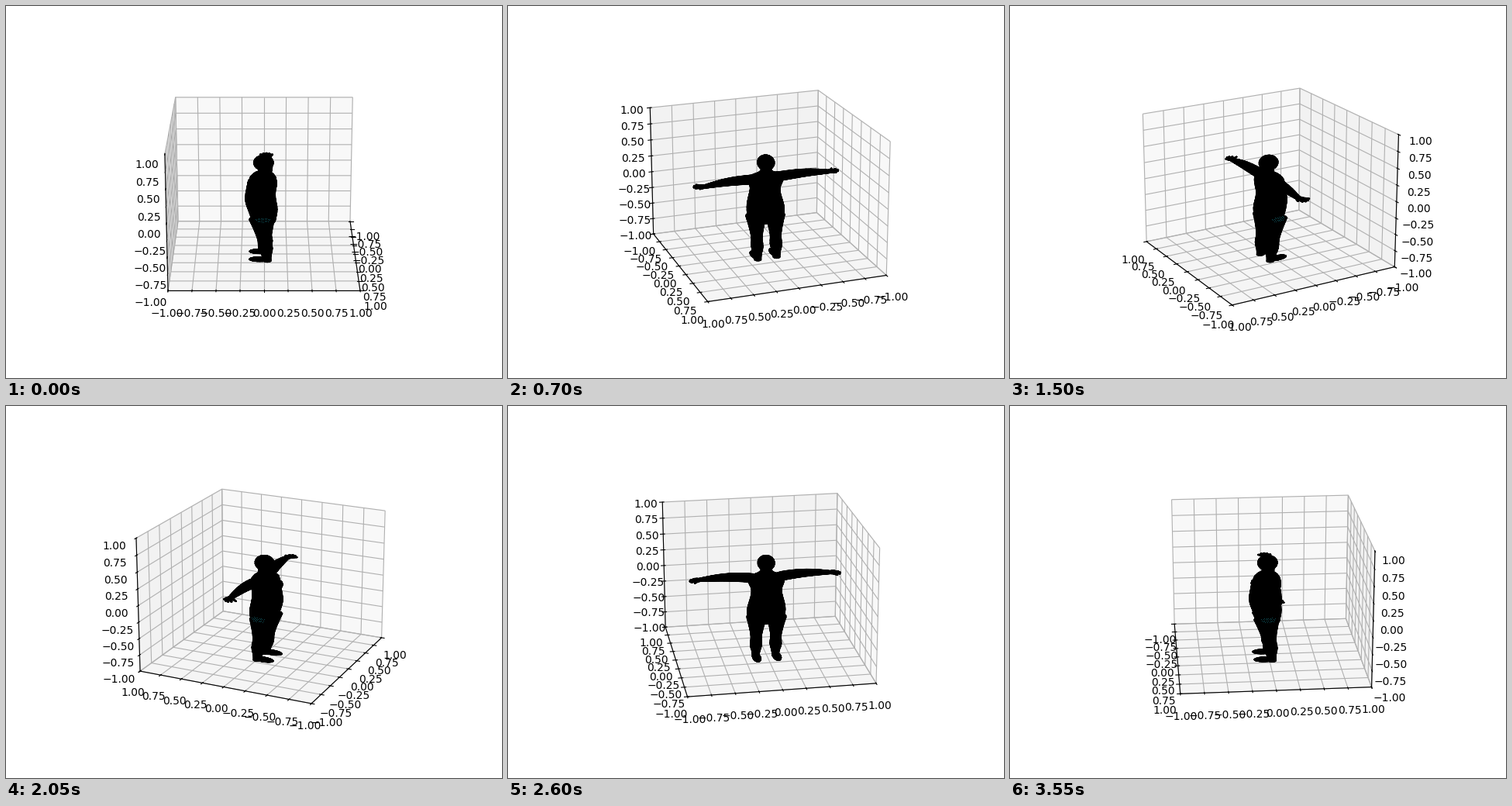
A matplotlib script that plays this animation: 640 by 480 pixels, repeating every 3600 ms.

```python
import numpy as np
import matplotlib.pyplot as plt
from matplotlib.animation import FuncAnimation
from mpl_toolkits.mplot3d.art3d import Poly3DCollection

FRAMES, INTERVAL = 72, 50
STEP = 360 / FRAMES
ELEV = 20
SIDES = (-1, 1)
X, Y, Z = np.eye(3)


def bump(t, at, width):
    return np.exp(-0.5 * ((t - at) / width) ** 2)


def smoothstep(t, low, high):
    s = np.clip((t - low) / (high - low), 0, 1)
    return s * s * (3 - 2 * s)


def tube(centers, ru, rv, u, v, seg=16):
    """Quads of a closed tube with elliptical rings spanned by u and v."""
    centers = np.vstack([centers[:1], centers, centers[-1:]])
    ru = np.r_[0, ru, 0][:, None, None]
    rv = np.r_[0, rv, 0][:, None, None]
    t = np.linspace(0, 2 * np.pi, seg + 1)[None, :, None]
    rings = centers[:, None] + ru * np.cos(t) * u + rv * np.sin(t) * v
    quads = np.stack([rings[:-1, :-1], rings[:-1, 1:],
                      rings[1:, 1:], rings[1:, :-1]], axis=2)
    return list(quads.reshape(-1, 4, 3))


def ellipsoid(center, radii, n=9):
    a = np.linspace(-np.pi / 2, np.pi / 2, n)
    centers = np.array(center) + np.outer(np.sin(a), radii[2] * Z)
    return tube(centers, radii[0] * np.cos(a), radii[1] * np.cos(a), X, Y)


def hip_width(z):
    return .150 + .060 * bump(z, -.31, .17) + .050 * bump(z, .17, .07)


def torso():
    z = np.linspace(-.46, .30, 20)
    slope = 1 - .65 * smoothstep(z, .19, .30)
    front = .130 + .075 * bump(z, -.13, .16) + .020 * bump(z, .10, .08)
    back = .120 + .024 * bump(z, -.30, .10) + .018 * bump(z, .10, .07)
    centers = np.c_[0 * z, slope * (back - front) / 2, z]
    return tube(centers, slope * hip_width(z), slope * (front + back) / 2,
                X, Y, 24)


def head():
    z = np.linspace(.22, .40, 4)
    neck = tube(np.outer(z, Z), np.full(4, .058), np.full(4, .064), X, Y)
    return neck + ellipsoid((0, -.006, .417), (.093, .109, .109), 12)


def leg(side):
    t = np.linspace(0, 1, 14)  # ankle to hip
    width = .038 + .07 * t ** 2 + .02 * bump(t, .3, .1)
    centers = np.c_[0 * t + side * .110, .035 - .06 * t, -1.05 + .65 * t]
    foot = ellipsoid((side * .113, -.045, -1.02), (.046, .122, .030))
    return tube(centers, width, 1.1 * width + .02 * t, X, Y) + foot


def arm(side):
    s = np.linspace(0, 1, 12)  # shoulder to wrist
    radius = .022 + .04 * (1 - s ** 2)
    centers = np.c_[side * (.13 + .60 * s), .05 * np.sqrt(s),
                    .19 + .022 * np.sin(np.pi * s)]
    quads = tube(centers, 1.1 * radius, radius, Y, Z)
    quads += ellipsoid((side * .74, .045, .192), (.055, .042, .020), 7)
    for k in range(5):
        base = side * .74, .015 + .016 * k, .192
        tip = side * (.83 - .012 * (k - 2) ** 2), -.04 + .033 * k, .188
        quads += tube(np.array([base, tip]), [.014, .010], [.014, .010],
                      Y, Z, 6)
    return quads


def body():
    quads = torso() + head()
    for side in SIDES:
        quads += leg(side) + arm(side)
        quads += ellipsoid((side * .085, -.115, .07), (.07, .065, .07), 7)
    return quads


def hip_dots(side):
    """Specks where the wide mesh cells of the hip let the skin through."""
    y, z = np.meshgrid(np.linspace(-.09, .06, 8), np.linspace(-.39, -.33, 4))
    y[1::2] += .010
    keep = ((y + .015) / .085) ** 2 + ((z + .36) / .042) ** 2 < 1
    y, z = y[keep], z[keep]
    x = side * hip_width(z) * np.sqrt(1 - ((y + .015) / .17) ** 2)
    return ax.plot(x, y, z, "s", ms=.5, mew=0, color="#12606a", zorder=50)[0]


fig = plt.figure(figsize=(6.4, 4.8), dpi=100)
ax = fig.add_subplot(projection="3d")
ax.add_collection3d(Poly3DCollection(body(), facecolors="black",
                                     edgecolors="black", linewidths=.6))
dots = {side: hip_dots(side) for side in SIDES}
ax.set(xlim=(-1, 1), ylim=(-1, 1), zlim=(-1, 1))


def update(i):
    azim = i * STEP
    ax.view_init(elev=ELEV, azim=azim)
    for side, line in dots.items():
        line.set_visible(bool(side * np.cos(np.radians(azim)) > .4))
    return []


anim = FuncAnimation(fig, update, frames=FRAMES, interval=INTERVAL,
                     repeat=True, repeat_delay=0)
plt.show()
```
